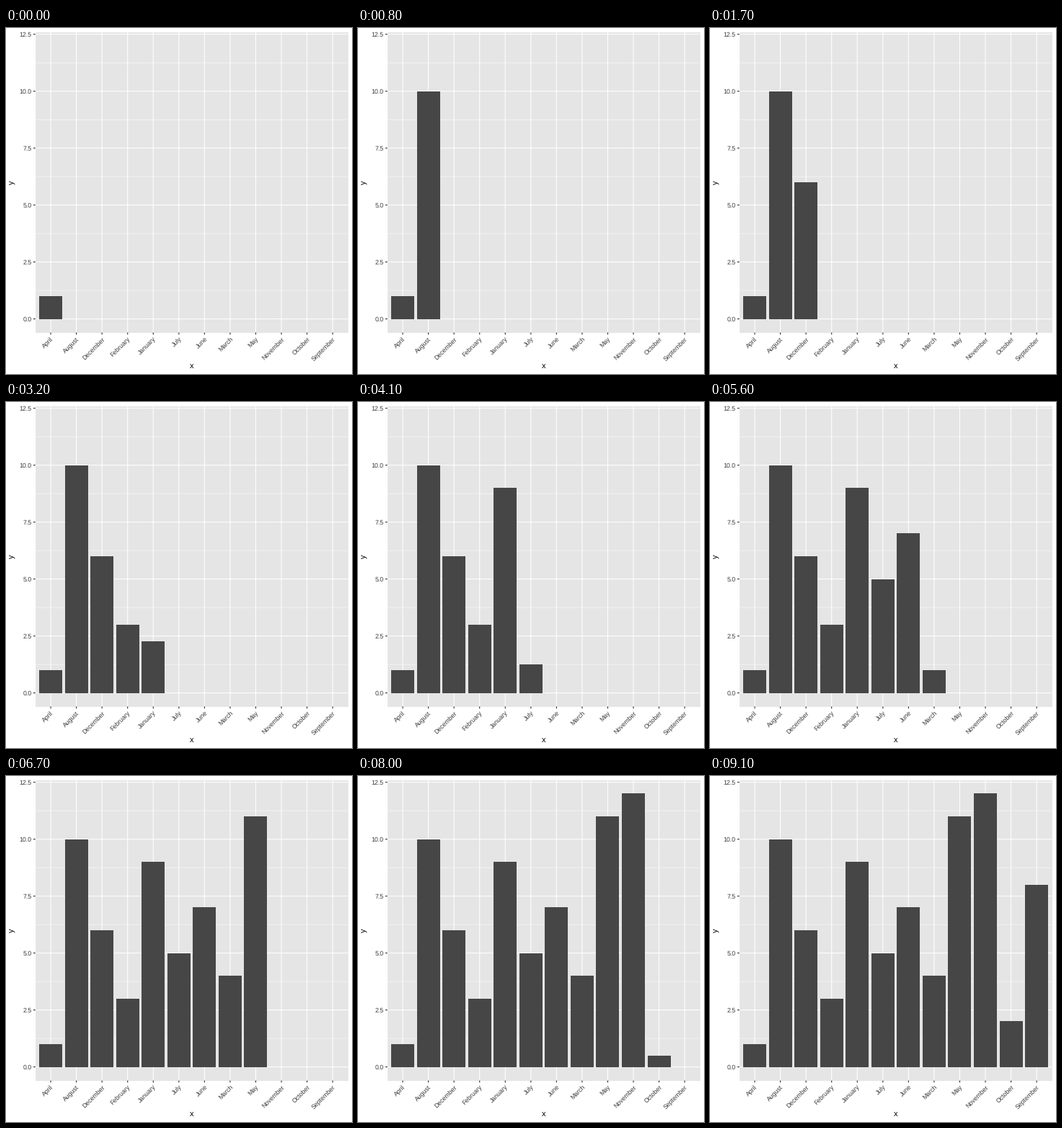
A matplotlib script for the animation above (10000 ms loop, 480 px wide and 480 px high).

```python
import math

import matplotlib.pyplot as plt
from matplotlib.animation import FuncAnimation
from matplotlib.patches import Rectangle

plt.rcParams["font.family"] = "Liberation Sans"
plt.rcParams["text.hinting"] = "none"

SIZE, DPI = 480, 72
FRAMES, INTERVAL = 100, 100

PANEL = "#e5e5e5"
BAR = "#464646"
TICK = "#242424"
LABEL = "#3b3b3b"

LEFT, RIGHT, TOP, BOTTOM = 40.7, 474.5, 5.5, 422.5
X_UNIT = (RIGHT - LEFT) / 12.2
Y_UNIT = (BOTTOM - TOP) / 13.2

# month, value, first frame of growth, number of growth steps
BARS = [
    ("April", 1, 0, 1),
    ("August", 10, 5, 4),
    ("December", 6, 14, 4),
    ("February", 3, 23, 4),
    ("January", 9, 32, 4),
    ("July", 5, 41, 4),
    ("June", 7, 49, 3),
    ("March", 4, 56, 4),
    ("May", 11, 64, 4),
    ("November", 12, 72, 4),
    ("October", 2, 80, 4),
    ("September", 8, 88, 4),
]


def x_pos(slot):
    return LEFT + (slot - 0.4) * X_UNIT


def y_pos(value):
    return BOTTOM - (value + 0.6) * Y_UNIT


def pixel(v):
    return math.floor(v + 0.5)


def add_rect(x0, y0, x1, y1, color, z):
    x0, y0, x1, y1 = map(pixel, (x0, y0, x1, y1))
    return ax.add_patch(Rectangle((x0, y0), x1 - x0, y1 - y0, fc=color,
                                  lw=0, antialiased=False, zorder=z))


def add_line(x0, y0, x1, y1, color, width, z):
    ax.plot([x0, x1], [y0, y1], color=color, lw=width, zorder=z,
            solid_capstyle="butt", snap=False)


def add_text(x, y, text, size, color, ha="center", rotation=0):
    ax.text(x, y, text, fontsize=size, color=color, ha=ha, va="baseline",
            rotation=rotation, rotation_mode="anchor")


fig = plt.figure(figsize=(SIZE / DPI, SIZE / DPI), dpi=DPI, facecolor="white")
ax = fig.add_axes([0, 0, 1, 1])
ax.set_autoscale_on(False)
ax.set_xlim(0, SIZE)
ax.set_ylim(SIZE, 0)
ax.axis("off")

add_rect(LEFT, TOP, RIGHT, BOTTOM, PANEL, 0)

for k in range(5):
    y = y_pos(1.25 + 2.5 * k)
    add_line(LEFT, y, RIGHT, y, "white", 0.53, 1)

for k in range(6):
    y = y_pos(2.5 * k)
    add_line(LEFT, y, RIGHT, y, "white", 1.07, 2)
    add_line(LEFT - 2.75, y, LEFT, y, TICK, 1.07, 4)
    add_text(LEFT - 4.95, y + 3.2, f"{2.5 * k:.1f}", 8.8, LABEL, ha="right")

rects = []
for slot, (month, *_) in enumerate(BARS, 1):
    x = x_pos(slot)
    add_line(x, TOP, x, BOTTOM, "white", 1.07, 2)
    add_line(x, BOTTOM, x, BOTTOM + 2.75, TICK, 1.07, 4)
    add_text(x + 4.45, BOTTOM + 9.4, month, 8.8, LABEL, ha="right", rotation=45)
    rects.append(add_rect(x_pos(slot - 0.45), y_pos(0),
                          x_pos(slot + 0.45), y_pos(0), BAR, 3))

add_text((LEFT + RIGHT) / 2, 472.5, "x", 11, "black")
add_text(11.2, (TOP + BOTTOM) / 2, "y", 11, "black", rotation=90)


def update(frame):
    base = pixel(y_pos(0))
    for rect, (_, value, start, steps) in zip(rects, BARS):
        grown = min(max((frame - start + 1) / steps, 0), 1)
        top = pixel(y_pos(value * grown))
        rect.set_y(top)
        rect.set_height(base - top)
        rect.set_visible(grown > 0)
    return rects


anim = FuncAnimation(fig, update, frames=FRAMES, interval=INTERVAL,
                     repeat=True, repeat_delay=0, blit=False)
plt.show()
```
